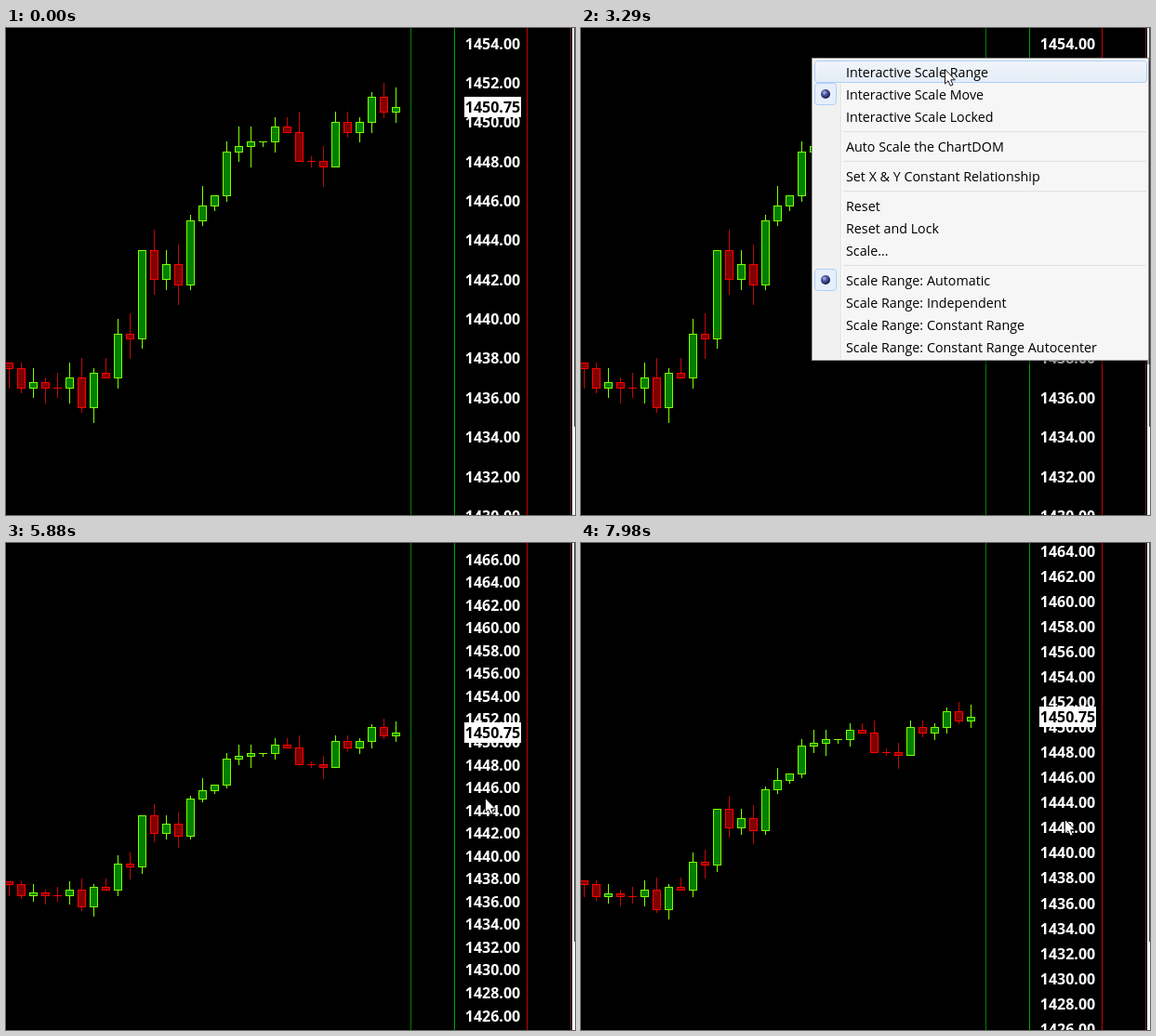
An HTML page that plays this animation: 612 by 524 pixels, repeating every 8000 ms.

```html
<!DOCTYPE html>
<html lang="en">
<head>
<meta charset="utf-8">
<title>Chart scale</title>
<style>
html, body { margin: 0; width: 100%; height: 100%; overflow: hidden; background: #000; }
svg { display: block; width: 612px; height: 524px; }
text { font-family: "Open Sans", "Noto Sans", sans-serif; }
.price { font-size: 16px; font-weight: 700; text-anchor: middle; fill: #fff; }
.item { font-size: 14.3px; fill: #000; }
.crisp { shape-rendering: crispEdges; }
</style>
</head>
<body>
<svg viewBox="0 0 612 524">
  <defs>
    <linearGradient id="hover" x2="0" y2="1">
      <stop offset="0" stop-color="#f0f5fa"/>
      <stop offset="1" stop-color="#e3edf7"/>
    </linearGradient>
    <radialGradient id="dot" cx=".38" cy=".35" r=".65">
      <stop offset="0" stop-color="#b4bde8"/>
      <stop offset=".45" stop-color="#4a559c"/>
      <stop offset="1" stop-color="#14194a"/>
    </radialGradient>
  </defs>
  <rect width="612" height="524"/>
  <g id="candles" class="crisp"></g>
  <g class="crisp">
    <rect x="435" width="1" height="524" fill="#008000"/>
    <rect x="482" width="1" height="524" fill="#00a000"/>
    <rect x="560" width="1" height="524" fill="#c80000"/>
    <rect x="607" width="1" height="524" fill="#602020"/>
    <rect x="609" width="2" height="524" fill="#eee"/>
    <rect x="611" width="1" height="429" fill="#555"/>
    <rect x="611" y="429" width="1" height="95" fill="#fff"/>
  </g>
  <g id="labels"></g>
  <g id="last">
    <rect x="493" y="-11" width="61" height="22" fill="#fff"/>
    <text class="price" x="523.5" y="6" style="fill:#000">1450.75</text>
  </g>
  <g id="menu">
    <rect x="252" y="36" width="360" height="326" opacity=".4"/>
    <rect x="248.5" y="32.5" width="362" height="325" fill="#f6f6f6" stroke="#979797"/>
    <rect x="250" y="34" width="29" height="322" fill="#f1f1f1"/>
    <path d="M279.5 34V356" stroke="#e2e3e3"/>
    <path d="M280.5 34V356" stroke="#fff"/>
    <rect id="hot" x="251.5" width="357" height="23" rx="3" fill="url(#hover)" stroke="#aecff7"/>
  </g>
  <path id="cursor" d="M.5 .5V16L4 12.8L6.4 18.2L9 17.1L6.7 11.8H11.3Z" fill="#fff" stroke="#000" stroke-width=".9"/>
</svg>
<script>
const LOOP = 8000, HEIGHT = 524, PIVOT = 1437.35, PIVOT_Y = 369.25, LAST = 1450.75;
const APPEAR = 500, MENU_OPEN = 2410, MENU_CLOSE = 4000;

// Closing prices in quarter points above 1437.50; each bar opens at the previous close
const closes = [0, -4, -3, -4, -4, -2, -8, -1, -2, 7, 6, 24, 18, 21, 17, 30, 33,
  35, 44, 45, 46, 46, 49, 48, 42, 42, 41, 50, 48, 50, 55, 52, 53];

// Pointer gestures; span is the price range that fills the stage
const rest = { x: 422, y: 491, span: 24.75 };
const moves = [
  { from: 440, to: 1460, x: 507, y: 146, bow: 80 },
  { from: 1660, to: 2080, x: 515, y: 196 },
  { from: 2870, to: 3290, x: 391, y: 44 },
  { from: 3490, to: 3740, x: 389, y: 46 },
  { from: 3940, to: 5120, x: 526, y: 367 },
  { from: 5120, to: 5880, x: 515, y: 274, span: 42.69 },
  { from: 6150, to: 6880, x: 522, y: 242, span: 50.5 },
  { from: 7620, to: 7980, x: 520, y: 297, span: 38.73 }
];

const groups = [
  ["Interactive Scale Range", "Interactive Scale Move", "Interactive Scale Locked"],
  ["Auto Scale the ChartDOM"],
  ["Set X & Y Constant Relationship"],
  ["Reset", "Reset and Lock", "Scale..."],
  ["Scale Range: Automatic", "Scale Range: Independent", "Scale Range: Constant Range",
    "Scale Range: Constant Range Autocenter"]
];
const checked = ["Interactive Scale Move", "Scale Range: Automatic"];

const $ = id => document.getElementById(id);
function set(el, attrs) {
  for (const k in attrs) el.setAttribute(k, attrs[k]);
  return el;
}
function add(parent, tag, attrs, text = "") {
  const el = set(document.createElementNS("http://www.w3.org/2000/svg", tag), attrs);
  el.textContent = text;
  return parent.appendChild(el);
}
function show(el, on) { set(el, { visibility: on ? "visible" : "hidden" }); }

let seed = 7;
function random() {
  seed = (seed * 16807) % 2147483647;
  return seed / 2147483647;
}
const wickLength = () => Math.floor(5 * random());

let open = 1, up = false;
const candles = closes.map((close, i) => {
  if (close !== open) up = close > open;
  const x = 3 + 13 * i, top = Math.max(open, close), bottom = Math.min(open, close);
  const bar = (left, width, fill) => add($("candles"), "rect", { x: left, width, fill });
  open = close;
  return {
    top, bottom, high: top + wickLength(), low: bottom - wickLength(),
    wick: bar(x, 1, up ? "#7fff00" : "#c00808"),
    edge: bar(x - 4, 9, up ? "#7fff00" : "#ff0000"),
    fill: bar(x - 3, 7, up ? "#008000" : "#800000")
  };
});

const labels = Array.from({ length: 30 }, () => add($("labels"), "text", { class: "price", x: 523.5 }));

const rows = [];
let rowY = 48;
groups.forEach((names, i) => {
  if (i) {
    add($("menu"), "path", { d: `M282 ${rowY - 8.5}H608`, stroke: "#e0e0e0" });
    rowY += 8;
  }
  for (const name of names) {
    if (checked.includes(name)) {
      add($("menu"), "rect", { x: 251.5, y: rowY - 12.5, width: 23, height: 23, rx: 3, fill: "#e6effa", stroke: "#aecff7" });
      add($("menu"), "circle", { cx: 263, cy: rowY - 1, r: 5, fill: "url(#dot)" });
    }
    add($("menu"), "text", { class: "item", x: 285, y: rowY + 5 }, name);
    rows.push(rowY);
    rowY += 24;
  }
});

function poseAt(t) {
  let pose = rest;
  for (const { from, to, x, y, span = pose.span, bow = 0 } of moves) {
    if (t <= from) break;
    const u = Math.min(1, (t - from) / (to - from)), e = u * u * (3 - 2 * u);
    const mix = (a, b) => a + (b - a) * e;
    pose = {
      x: mix(pose.x, x) + bow * Math.sin(Math.PI * e),
      y: mix(pose.y, y),
      span: mix(pose.span, span)
    };
  }
  return pose;
}

function drawChart(span) {
  const scale = HEIGHT / span;
  const yOf = price => PIVOT_Y + (PIVOT - price) * scale;
  const tick = k => Math.floor(yOf(1437.5 + k / 4));
  for (const c of candles) {
    const high = tick(c.high), top = tick(c.top), height = tick(c.bottom) - top;
    set(c.wick, { y: high, height: tick(c.low) - high + 1 });
    set(c.edge, { y: top, height: height + 1 });
    set(c.fill, { y: top + 1, height: Math.max(0, height - 1) });
  }
  const step = scale < 11 ? 5 : 2;
  const first = Math.ceil((PIVOT - (HEIGHT + 16 - PIVOT_Y) / scale) / step) * step;
  labels.forEach((el, i) => {
    const price = first + i * step;
    el.textContent = price.toFixed(2);
    set(el, { y: Math.round(yOf(price)) + 6 });
  });
  set($("last"), { transform: `translate(0 ${Math.floor(yOf(LAST))})` });
}

function draw(t) {
  const { x, y, span } = poseAt(t);
  drawChart(span);
  show($("menu"), t >= MENU_OPEN && t < MENU_CLOSE);
  set($("menu"), { opacity: t < MENU_OPEN + 60 ? .5 : 1 });
  const near = rows.reduce((a, b) => Math.abs(b - y) < Math.abs(a - y) ? b : a);
  set($("hot"), { y: near - 12.5 });
  show($("cursor"), t >= APPEAR);
  set($("cursor"), { transform: `translate(${Math.round(x)} ${Math.round(y)})` });
}

const start = performance.now();
function frame() {
  draw((performance.now() - start) % LOOP);
  requestAnimationFrame(frame);
}
frame();
</script>
</body>
</html>
```
